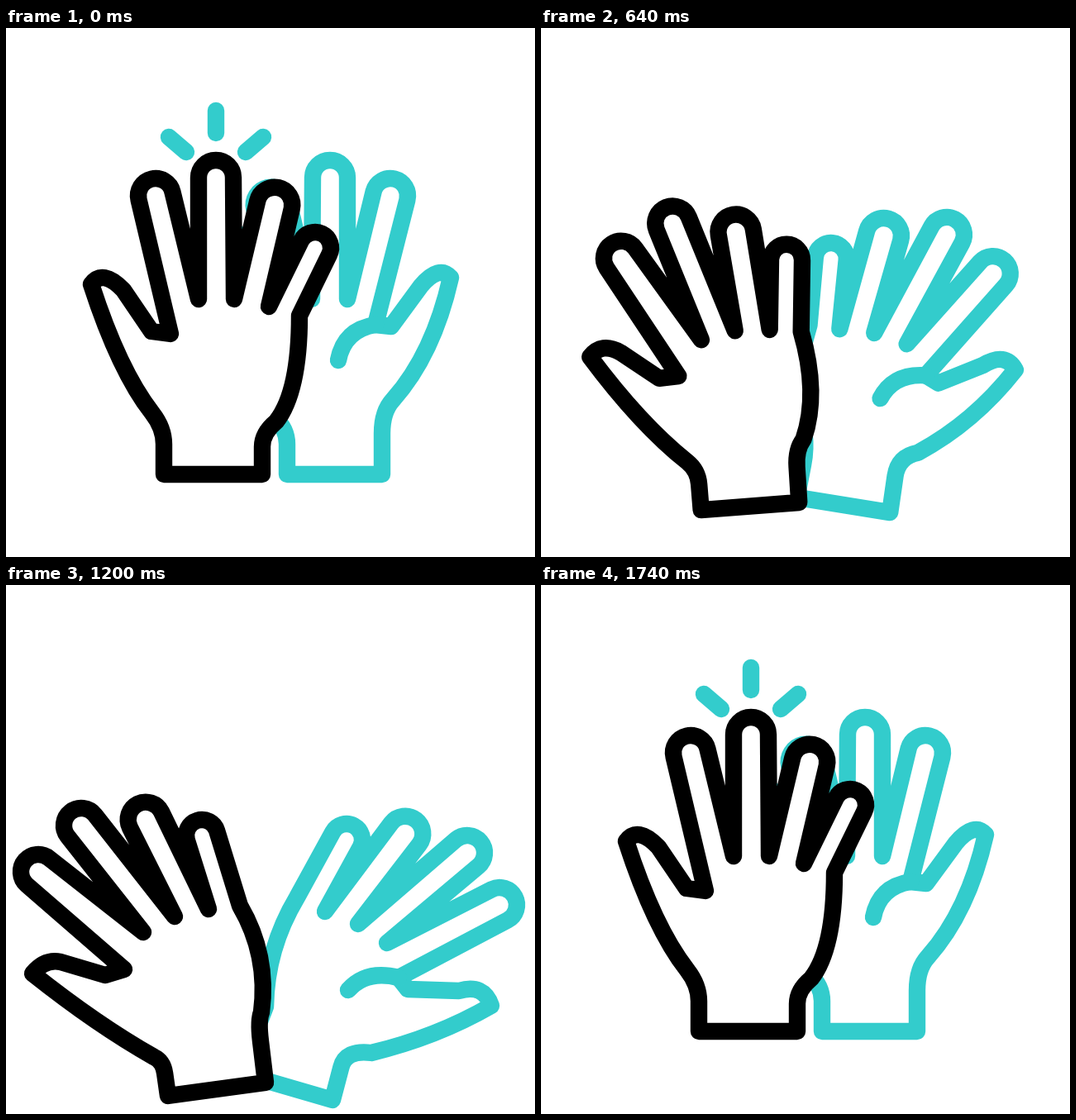
Animation, 640 px wide and 640 px high, one loop 2400 ms. Source, as an HTML page with a canvas:

```html
<!DOCTYPE html>
<html lang="en">
<head>
<meta charset="utf-8">
<title>High five</title>
<style>
html, body { margin: 0; width: 100%; height: 100%; overflow: hidden; background: #fff; }
canvas { display: block; width: 640px; height: 640px; }
</style>
</head>
<body>
<canvas width="640" height="640"></canvas>
<script>
const ctx = document.querySelector('canvas').getContext('2d');
const LOOP = 2400, TURN = 1200;
const TEAL = '#33cccc';

// Points of a hand, as x,y pairs: index base, four fingers as tip centre + inner base,
// pinky side, wrist, thumb, and for the palm its crease.
const pairs = list => list.flatMap((x, i) => i % 2 ? [] : [[x, list[i + 1]]]);

const backRest = pairs([
  199,370, 181,203, 233,328, 254,181, 276,328, 325,214, 318,337, 374,266, 355,348, 355,440,
  327,476, 310,490, 310,540, 191,540, 191,484, 177,466,
  137,415, 103,310, 117,291, 142,317, 176,367]);
const backOpen = pairs([
  143,465, 39,347, 166,420, 91,291, 204,401, 169,284, 245,392, 237,303, 283,388, 318,448,
  309,517, 305,527, 314,602, 196,618, 190,576, 179,571,
  110,532, 32,470, 47,452, 66,456, 120,472]);
const palmRest = [
  [447, 359],
  ...backRest.slice(1, 10).map(([x, y]) => [646 - x, y]),
  ...pairs([
    325,471, 340,485, 340,540, 455,540, 455,464, 468,450,
    517,395, 538,302, 524,286, 502,312, 466,361, 409,365, 402,402])];
const palmOpen = pairs([
  475,475, 597,387, 461,433, 558,324, 426,410, 483,301, 386,395, 412,308, 352,378, 315,440,
  314,510, 306,530, 285,591, 395,623, 411,562, 442,566,
  521,547, 587,509, 578,482, 548,491, 486,489, 436,465, 414,490]);

const black = { color: '#000', side: 1, steep: 0.8, base: [250.5, 540], shift: [4.5, 70],
  rest: backRest, open: backOpen };
const teal = { color: TEAL, side: -1, steep: 0.6, base: [397.5, 540], shift: [-57, 67],
  rest: palmRest, open: palmOpen };
const sparks = [[254, 127, 254, 100], [218, 150, 197, 132], [290, 150, 311, 132]];

const mix = (a, b, k) => a + (b - a) * k;
const between = (p, q, k) => [mix(p[0], q[0], k), mix(p[1], q[1], k)];

function ease(x) {
  x = Math.min(1, Math.max(0, x));
  return x * x * (3 - 2 * x);
}

// 0 at rest, 1 when fully open
function swing(t, from, to) {
  return t < TURN ? ease(t / TURN) : 1 - ease((t - from) / (to - from));
}

// Each point bends around the wrist, part straight and part on an arc, while the wrist slides.
function pose({ rest, open, base: [bx, by], shift: [sx, sy], steep }, move, bend) {
  const k = mix(bend, ease(bend), steep);
  return rest.map(([x, y], i) => {
    const p = [x - bx, y - by];
    const q = [open[i][0] - sx - bx, open[i][1] - sy - by];
    const r = mix(Math.hypot(...p), Math.hypot(...q), k);
    const a = mix(Math.atan2(p[0], -p[1]), Math.atan2(q[0], -q[1]), k);
    const [u, v] = between(between(p, q, k), [r * Math.sin(a), -r * Math.cos(a)], 0.6);
    return [bx + u + sx * move, by + v + sy * move];
  });
}

// Round fingertip, joined by tangents to the bases on either side
function finger(from, [x, y], to, r, side) {
  const tangent = (p, s) => {
    const dx = p[0] - x, dy = p[1] - y;
    return Math.atan2(dy, dx) + s * Math.acos(r / Math.hypot(dx, dy));
  };
  ctx.arc(x, y, r, tangent(from, side), tangent(to, -side), side < 0);
  ctx.lineTo(...to);
}

function drawHand(hand, move, bend) {
  const p = pose(hand, move, bend);
  const line = q => ctx.lineTo(...q);
  const curve = (c, q) => ctx.quadraticCurveTo(...c, ...q);
  ctx.beginPath();
  ctx.moveTo(...p[0]);
  [21, 21, 21.3, 19].forEach((r, i) => finger(p[2 * i], p[2 * i + 1], p[2 * i + 2], r, hand.side));
  curve(p[9], p[10]);
  curve(p[11], between(p[11], p[12], 0.33));
  line(p[12]);
  line(p[13]);
  line(between(p[14], p[13], 0.35));
  curve(p[14], p[15]);
  curve(p[16], p[17]);
  curve(p[18], p[19]);
  line(p[20]);
  ctx.closePath();
  ctx.fillStyle = '#fff';
  ctx.strokeStyle = hand.color;
  ctx.fill();
  ctx.stroke();
  if (p[21]) {
    ctx.beginPath();
    ctx.moveTo(...p[0]);
    curve(p[21], p[22]);
    ctx.stroke();
  }
}

function drawSparks(t) {
  const grow = t < TURN ? 1 - ease(t / 160) : ease((t - 1600) / 140);
  if (!grow) return;
  ctx.strokeStyle = TEAL;
  ctx.beginPath();
  for (const [x, y, x2, y2] of sparks) {
    ctx.moveTo(x, y);
    ctx.lineTo(mix(x, x2, grow), mix(y, y2, grow));
  }
  ctx.stroke();
}

function draw(t) {
  ctx.fillStyle = '#fff';
  ctx.fillRect(0, 0, 640, 640);
  ctx.lineWidth = 20.4;
  ctx.lineCap = ctx.lineJoin = 'round';
  const move = swing(t, TURN, 1660);
  drawHand(teal, move, swing(t, 1260, 1708));
  drawHand(black, move, move);
  drawSparks(t);
}

const start = performance.now();
function tick() {
  draw((performance.now() - start) % LOOP);
  requestAnimationFrame(tick);
}
tick();
</script>
</body>
</html>
```
